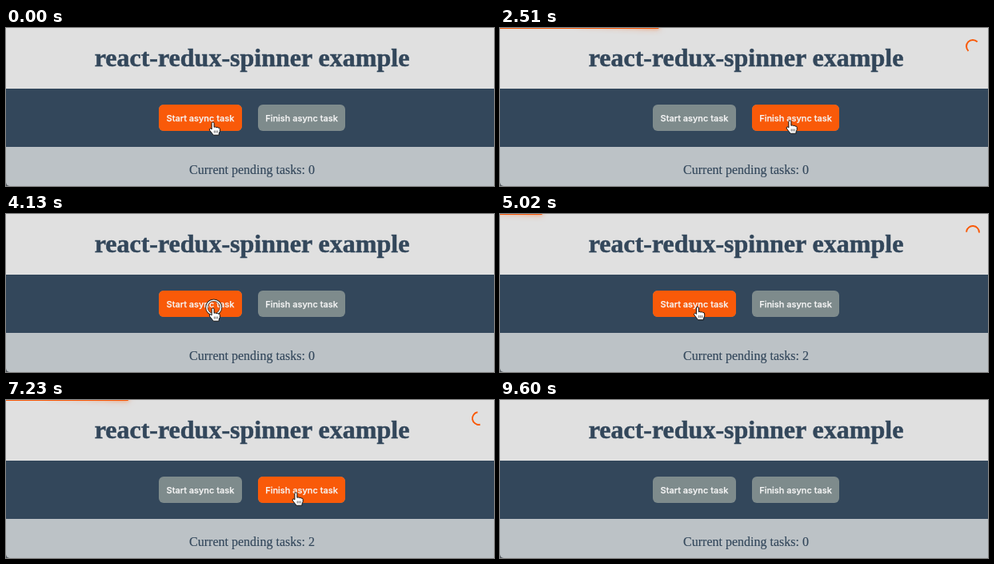
These frames come from a looping animation (610 px wide and 198 px high, 9.87 s). An HTML page:

```html
<!DOCTYPE html>
<html lang="en">
<head>
<meta charset="utf-8">
<title>react-redux-spinner example</title>
<style>
  html, body { margin: 0; width: 100%; height: 100%; overflow: hidden; }
  #stage { position: relative; width: 610px; height: 198px; overflow: hidden; background: #e0e0e0; }
  svg { position: absolute; left: 0; top: 0; }
  text { text-anchor: middle; fill: #33475b; stroke: #33475b; stroke-width: .15px;
    font-family: "Liberation Serif", "Times New Roman", serif; }
  h1, .title { font-size: 32px; font-weight: bold; stroke-width: .5px; }
  .label { font: 500 11px Inter, sans-serif; fill: #f6f6f6; stroke: #f6f6f6; stroke-width: .25px; }
  .btn { fill: #7e8b8c; }
  .hot { fill: #f95a09; }
  #bar { position: absolute; left: 0; top: -1px; width: 615px; height: 2px; background: #f95a09; }
  #peg { position: absolute; right: 0; width: 100px; height: 100%;
    box-shadow: 0 0 10px #f95a09, 0 0 5px #f95a09; transform: rotate(3deg) translate(0, -4px); }
  #spinner { position: absolute; left: 582px; top: 14px; width: 18px; height: 18px; box-sizing: border-box;
    border: 2px solid transparent; border-top-color: #f95a09; border-left-color: #f95a09; border-radius: 50%; }
</style>
</head>
<body>
<div id="stage">
  <svg width="610" height="198">
    <rect y="76" width="610" height="73" fill="#33475b"/>
    <rect y="149" width="610" height="49" fill="#bcc2c6"/>
    <path d="M0 193.5Q.5 197.5 4.5 198H0z" fill="#555b60"/>
    <text class="title" x="307.5" y="48">react-redux-spinner example</text>
    <text id="count" x="307.5" y="183" font-size="16"></text>
    <rect class="btn" x="191" y="96" width="104" height="33" rx="6"/>
    <rect class="hot" id="startHot" x="191" y="96" width="104" height="33" rx="6"/>
    <rect class="btn" x="315" y="96" width="109" height="33" rx="6"/>
    <rect class="hot" id="finishHot" x="315" y="96" width="109" height="33" rx="6"/>
    <text class="label" x="243" y="117">Start async task</text>
    <text class="label" x="369.5" y="117">Finish async task</text>
    <g id="cursor">
      <g id="ring" fill="none">
        <circle cx="1" cy="-1" r="9" stroke="#222" stroke-width="3"/>
        <circle cx="1" cy="-1" r="8.8" stroke="#fff" stroke-width="1.6"/>
      </g>
      <path d="M-1.6 9V1.5a1.5 1.5 0 0 1 3 0V6.3q1.5-1 2.6.3 1.6-.9 2.5.5 2-.6 2.2 1.4v2.8l-1.2 3v1.9h-6.9l-4.7-6q-.9-1.9.6-2.4 1 0 1.9 1.2z"
        fill="#fff" stroke="#111" stroke-linejoin="round"/>
      <path d="M1.7 10.5v3M3.7 10.5v3M5.7 10.5v3" stroke="#222" stroke-width=".7"/>
    </g>
  </svg>
  <div id="bar"><div id="peg"></div></div>
  <div id="spinner"></div>
</div>
<script>
const LOOP = 9870, FRAME = 147.5, FIRST = 900;
const FADE = 170, MOVE = 60, PRESS = 140, TRICKLE = 700;

// Time of each click: +1 starts a task, -1 finishes one
const clicks = { 1040: 1, 2490: -1, 4270: 1, 4850: 1, 5740: 1, 7080: -1, 7820: -1, 8430: -1 };
// Cursor moves: [departure, x, y]
const stops = [[-MOVE, 258.7, 118], [1750, 362.5, 116], [3304, 258.7, 118], [4290, 247, 116.5],
  [6445, 339.5, 117], [6530, 362.5, 116], [9240, 700, 116]];

// Keys: [start, value, duration]
const xKeys = stops.map(([t, x]) => [t, x, MOVE]);
const yKeys = stops.map(([t, , y]) => [t, y, MOVE]);
const hover = (from, to) => stops.map(([t, x]) => [t + MOVE, +(x > from && x < to), t < 0 ? 0 : FADE]);
const startKeys = hover(191, 295), finishKeys = hover(315, 424);
const barKeys = [], fadeKeys = [], countKeys = [], sessionKeys = [];

// Progress: 8% at first, a little per trickle, a tenth of the rest per finished task
let pending = 0, goal = 0, tasks = [];
for (let t = 0; t < LOOP; t += 10) {
  const change = clicks[t] || 0;
  const ticks = tasks.filter(s => (t - s) % TRICKLE === 0).length;
  if (!change && !ticks) continue;
  goal += ticks * .0095;
  if (change > 0) {
    if (!pending) {
      goal = .08;
      barKeys.push([t, 0, 0]);
      fadeKeys.push([t, 1, 0]);
      sessionKeys.push([t, t, 0]);
    }
    tasks.push(t);
  }
  pending += change;
  if (change < 0) goal += .1 * (1 - goal);
  if (pending) {
    barKeys.push([t, goal, FADE]);
  } else {
    barKeys.push([t, .75, FADE], [t + FADE, 1, FADE]);
    fadeKeys.push([t + 2 * FADE, 0, FADE]);
    tasks = [];
  }
  countKeys.push([t, pending, 0]);
}

const $ = id => document.getElementById(id);
const ease = x => 1 - (1 - x) ** 2;

function valueAt(keys, t) {
  let v = 0;
  for (const [start, value, duration] of keys) {
    if (t < start) break;
    v += (value - v) * (duration ? ease(Math.min(1, (t - start) / duration)) : 1);
  }
  return v;
}

function draw(now) {
  // Hold each pose for one recorded frame
  const t = FIRST + FRAME * Math.floor((now % LOOP - FIRST) / FRAME + .15);
  const angle = (t - valueAt(sessionKeys, t)) * .929 + 62;
  const pressed = Object.keys(clicks).some(c => t >= c - PRESS && t < c);

  $("count").textContent = "Current pending tasks: " + valueAt(countKeys, t);
  $("startHot").style.opacity = valueAt(startKeys, t);
  $("finishHot").style.opacity = valueAt(finishKeys, t);
  $("cursor").setAttribute("transform", `translate(${valueAt(xKeys, t)} ${valueAt(yKeys, t)})`);
  $("ring").style.display = pressed ? "" : "none";
  $("bar").style.transform = `translateX(${(valueAt(barKeys, t) - 1) * 100}%)`;
  $("spinner").style.transform = `rotate(${angle}deg)`;
  $("bar").style.opacity = $("spinner").style.opacity = valueAt(fadeKeys, t);
}

const origin = performance.now();
function tick() {
  draw(performance.now() - origin);
  requestAnimationFrame(tick);
}
tick();
</script>
</body>
</html>
```
